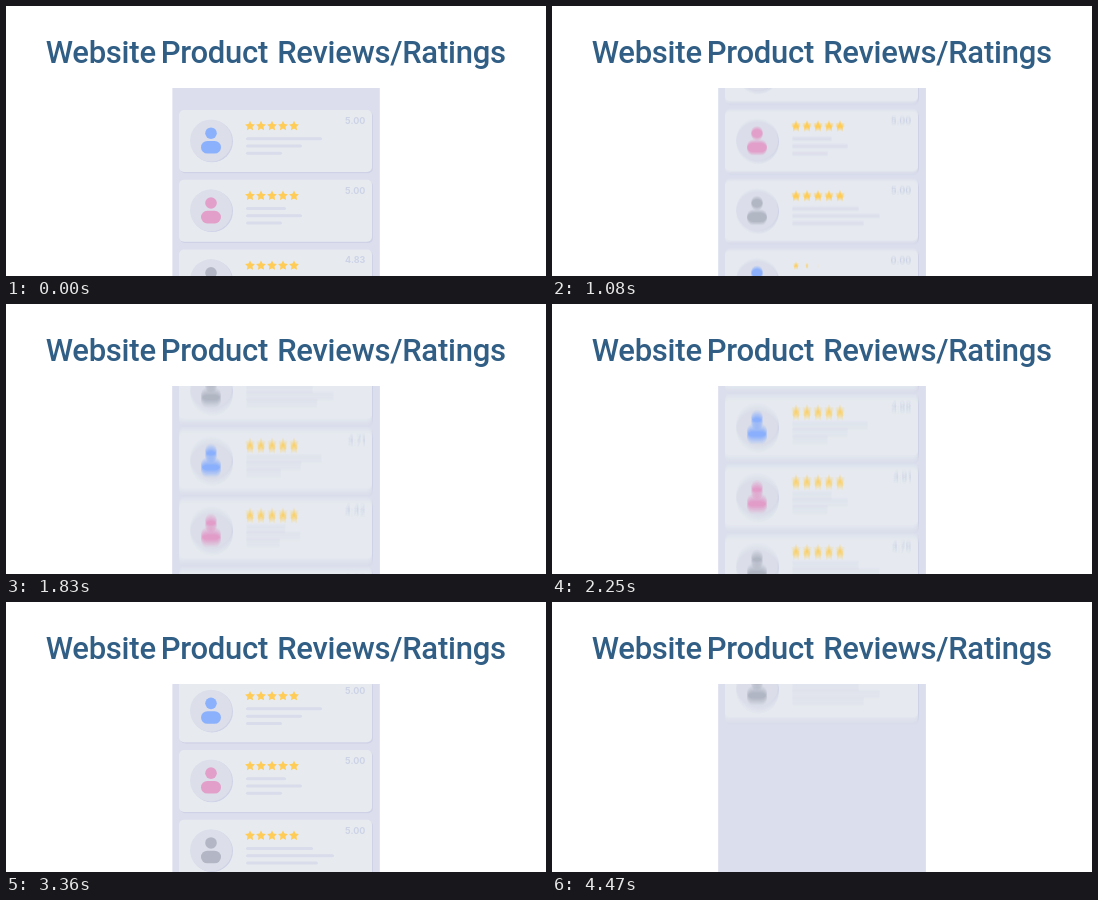
An HTML page with a canvas for the animation above (4.5 s loop, 540 by 270 pixels).

```html
<!DOCTYPE html>
<html lang="en">
<head>
<meta charset="utf-8">
<title>Website Product Reviews/Ratings</title>
<style>
  html, body { margin: 0; width: 100%; height: 100%; overflow: hidden; background: #fff; }
  canvas { display: block; width: 540px; height: 270px; }
</style>
</head>
<body>
<canvas id="stage" width="540" height="270"></canvas>
<script>
const stage = document.getElementById('stage').getContext('2d');
const PANEL = { x: 166.4, y: 82, w: 207.4, h: 188 };
const LOOP = 4500, STEP = 30, HOLD = 750, SHUTTER = 0.015;
const CARDS = 15, PITCH = 69.8, FIRST_TOP = 104;
const COLORS = { panel: '#dcdeed', card: '#e7ebf0', shadow: '#cfd2e6', disc: '#dcdfea', line: '#d9dcea', score: '#cdd3e6', star: '#ffcc57', title: '#315e85' };
const PEOPLE = [
  { color: '#8cb1fc', lines: [76, 56, 36] },
  { color: '#e29fca', lines: [40, 56, 36] },
  { color: '#b3b7c5', lines: [67, 88, 72] }
];

// Scroll path: time (s), offset (px), speed (px/s)
const PATH = [
  [0.64, 0, 95], [0.75, 10, 88], [1.41, 185.6, 430], [2.25, 639.5, 580],
  [2.94, 834.8, 85], [3.84, 886.4, 45], [3.96, 892.4, 60], [4.47, 1025, 520]
];

const clamp = v => Math.max(0, Math.min(1, v));
const easeOut = v => 1 - (1 - clamp(v)) ** 3;

function scrollAt(t) {
  let i = 0;
  while (i < PATH.length - 2 && t >= PATH[i + 1][0]) i++;
  const [t0, p0, v0] = PATH[i], [t1, p1, v1] = PATH[i + 1];
  const d = t1 - t0, u = (t - t0) / d, w = 1 - u;
  return p0 * (1 + 2 * u) * w * w + p1 * u * u * (3 - 2 * u) + d * u * w * (v0 * w - v1 * u);
}

function progress(n, t) {
  const start = n < 3 ? 0.1 - 0.3 * (2 - n) : 1.1 + 0.08 * (n - 3);
  return (t - start) / 0.8;
}

function pill(c, x, y, w, h, r, color) {
  c.fillStyle = color;
  c.beginPath();
  c.roundRect(x, y, w, h, r);
  c.fill();
}

function disc(c, x, y, r, color) {
  c.fillStyle = color;
  c.beginPath();
  c.arc(x, y, r, 0, 2 * Math.PI);
  c.fill();
}

function star(c, x, y, r) {
  c.fillStyle = COLORS.star;
  c.beginPath();
  for (let i = 0; i < 10; i++) {
    const a = i * Math.PI / 5 - Math.PI / 2, q = i % 2 ? r * 0.5 : r;
    c.lineTo(x + q * Math.cos(a), y + q * Math.sin(a));
  }
  c.fill();
}

function drawCard(c, n, y, t) {
  const who = PEOPLE[n % 3], p = progress(n, t);
  pill(c, 174, y + 1.3, 193, 62, 5, COLORS.shadow);
  pill(c, 173, y, 193, 62, 5, COLORS.card);
  disc(c, 206, y + 31.3, 21, COLORS.shadow);
  disc(c, 205, y + 30.5, 21, COLORS.disc);
  disc(c, 205, y + 23.2, 5.8, who.color);
  pill(c, 195, y + 31, 20, 12.6, 6.3, who.color);
  for (let i = 0; i < 5; i++) {
    const size = clamp((p - 0.09 + 0.08 * (4 - i)) * 3);
    if (size > 0) star(c, 244 + 11 * i, y + 16, 5.2 * size);
  }
  who.lines.forEach((w, i) => {
    const len = w * easeOut(p + 0.29 - 0.09 * i);
    if (len > 0) pill(c, 240, y + 27.2 + 7.3 * i, len, 3, 1.5, COLORS.line);
  });
  c.fillStyle = COLORS.score;
  c.font = '700 9px Inter, sans-serif';
  c.textAlign = 'right';
  c.fillText((5 * easeOut(p)).toFixed(2), 359.3, y + 13.8);
}

const layer = document.createElement('canvas');
layer.width = 540;
layer.height = 270;
const list = layer.getContext('2d');

function drawList(offset, t) {
  list.fillStyle = COLORS.panel;
  list.fillRect(0, 0, 540, 270);
  for (let n = 0; n < CARDS; n++) {
    const y = FIRST_TOP + n * PITCH - offset;
    if (y > 10 && y < 272) drawCard(list, n, y, t);
  }
}

function drawTitle() {
  stage.fillStyle = COLORS.title;
  stage.font = '500 31px Roboto, sans-serif';
  stage.textAlign = 'left';
  stage.letterSpacing = '-0.25px';
  stage.fillText('Website', 39.7, 57);
  stage.fillText('Product', 154.7, 57);
  stage.fillText('Reviews/Ratings', 271.2, 57);
}

function render(ms) {
  const t = ms < HOLD ? PATH[0][0] : Math.floor(ms / STEP) * STEP / 1000;
  stage.fillStyle = '#fff';
  stage.fillRect(0, 0, 540, 270);
  drawTitle();
  stage.save();
  stage.beginPath();
  stage.rect(PANEL.x, PANEL.y, PANEL.w, PANEL.h);
  stage.clip();
  // Motion blur: average several positions within the shutter time
  const travel = scrollAt(t + SHUTTER / 2) - scrollAt(t - SHUTTER / 2);
  const samples = travel < 1.6 ? 1 : Math.ceil(travel * 1.4);
  for (let i = 0; i < samples; i++) {
    drawList(scrollAt(t + ((i + 0.5) / samples - 0.5) * SHUTTER), t);
    stage.globalAlpha = 1 / (i + 1);
    stage.drawImage(layer, 0, 0);
  }
  stage.restore();
}

const begin = performance.now();
function tick() {
  render((performance.now() - begin) % LOOP);
  requestAnimationFrame(tick);
}
tick();
</script>
</body>
</html>
```
